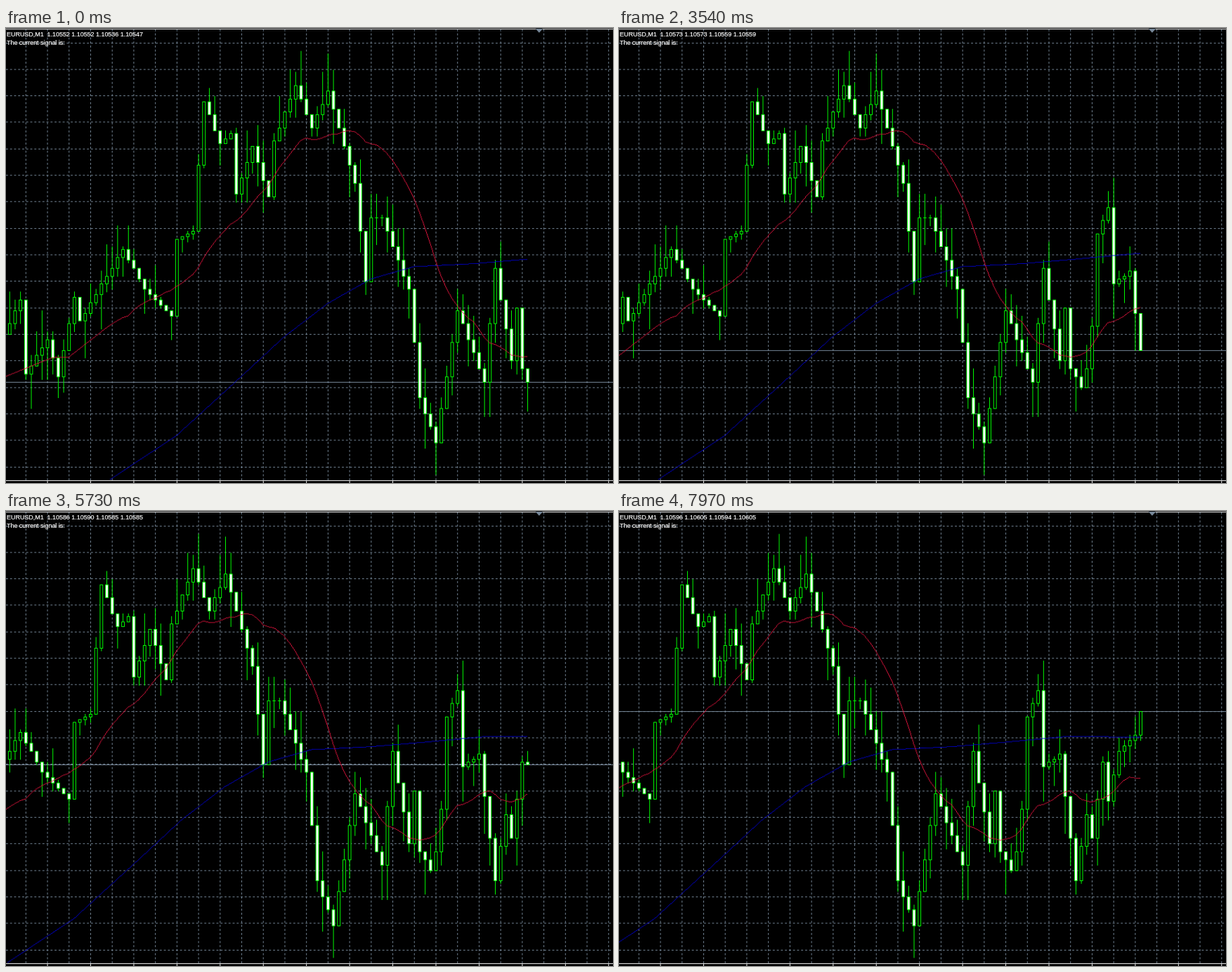
An HTML page with a canvas for the animation above (8000 ms loop, 864x648 px).

```html
<!DOCTYPE html>
<html lang="en">
<head>
<meta charset="utf-8">
<title>EURUSD,M1</title>
<style>
  html, body { margin: 0; width: 864px; height: 648px; overflow: hidden; background: #000; }
  canvas { position: absolute; left: 0; top: 0; }
  #info {
    position: absolute; left: 1px; top: 3px; color: #fff; white-space: pre;
    font: 9px/12px "Liberation Sans", Arial, sans-serif;
    letter-spacing: -0.04px; -webkit-text-stroke: 0.2px #fff;
  }
</style>
</head>
<body>
<canvas id="chart" width="864" height="648"></canvas>
<div id="info"><div id="quote"></div><div>The current signal is:</div></div>
<script>
const LOOP = 8000, TICK = 47.2, FIRST_TICK = 40;
const COUNT = 122, VISIBLE = 97, PERIOD = 20;
// The chart is laid out on a 900 x 675 pixel grid, then scaled down
const SCALE = 0.96, WIDTH = 900, BOTTOM = 671, PITCH = 8, LEFT = 5;
const LIME = '#00ff00', SLATE = '#778899';

// Turning points of the price: [candle, points above 1.10500]
const turns = [
  [-1, 65], [2, 78], [3, 50], [7, 63], [9, 49], [12, 79], [13, 70], [21, 97], [25, 82],
  [30, 72], [31, 101], [34, 104], [36, 153], [39, 137], [41, 141], [42, 118], [45, 136],
  [48, 117], [49, 138], [53, 159], [56, 143], [59, 157], [64, 122], [66, 85], [67, 109],
  [69, 109], [74, 82], [76, 41], [79, 24], [83, 74], [88, 47], [90, 90], [93, 55], [94, 75],
  [95, 52], [97, 45], [98, 52], [99, 68], [100, 103], [102, 113], [103, 84], [106, 89],
  [109, 41], [111, 66], [112, 57], [114, 86], [115, 71], [117, 90], [120, 96], [121, 105]];
// Start of the fast average, and the whole slow one
const earlyFast = [[-1, 48.8], [8, 56.2], [11, 56.3], [19, 69]];
const slow = [[19, 10.5], [31, 26.7], [43, 49], [51, 64.1], [59, 76.6], [67, 85.9],
  [75, 90.6], [86, 91.7], [96, 93.4], [107, 95.5], [122, 95.4]];
// [time, candle that opens then]
const schedule = [[-300, 96], [10, 97], [900, 99], [2210, 104], [3370, 108],
  [4640, 112], [4990, 113], [6480, 118], [7760, 121], [8040, 122]];

const ctx = document.getElementById('chart').getContext('2d');
const quote = document.getElementById('quote');
ctx.scale(SCALE, SCALE);

const mix = (a, b, k) => a + (b - a) * k;
const rowOf = points => Math.round(297 + (105 - points) * 3.925);

function interpolate(points, x) {
  let n = 1;
  while (n < points.length - 1 && points[n][0] < x) n++;
  const [x0, y0] = points[n - 1], [x1, y1] = points[n];
  return mix(y0, y1, (x - x0) / (x1 - x0));
}

// Seeded wick length: mostly short, now and then long
function wick(seed) {
  const noise = Math.sin(seed * 12.9898) * 43758.5453;
  return Math.round(14 * (noise - Math.floor(noise)) ** 2);
}

const closeAt = i => Math.round(interpolate(turns, i));
const candles = Array.from({ length: COUNT }, (_, i) => {
  const open = closeAt(i - 1), close = closeAt(i);
  return {
    open, close,
    high: Math.max(open, close) + wick(2 * i + 1),
    low: Math.min(open, close) - wick(2 * i + 2)
  };
});

// The price runs open, near extreme, far extreme, close
function formingCandle({ open, high, low, close }, phase) {
  const path = close >= open ? [open, low, high, close] : [open, high, low, close];
  const leg = Math.min(2, Math.floor(phase * 3));
  const price = Math.round(mix(path[leg], path[leg + 1], phase * 3 - leg));
  const seen = [...path.slice(0, leg + 1), price];
  return { open, high: Math.max(...seen), low: Math.min(...seen), close: price };
}

function rect(color, x, y, w, h) {
  ctx.fillStyle = color;
  ctx.fillRect(x, y, w, h);
}

function drawFrame() {
  rect('#000', 0, 0, WIDTH, 675);
  ctx.strokeStyle = SLATE;
  ctx.setLineDash([3, 3]);
  ctx.beginPath();
  for (let x = 29.5; x < WIDTH; x += 32) {
    ctx.moveTo(x, 2);
    ctx.lineTo(x, BOTTOM);
  }
  for (let k = 0; k < 17; k++) {
    const y = Math.floor(22 + k * 39.33) + 0.5;
    ctx.moveTo(0, y);
    ctx.lineTo(WIDTH, y);
  }
  ctx.stroke();
  rect('#fff', 0, 1, WIDTH, 1);
  rect('#fff', 0, BOTTOM, WIDTH, 1);
  for (let x = 61; x < WIDTH; x += 64) rect('#fff', x, BOTTOM + 1, 1, 3);
  ctx.fillStyle = SLATE;
  ctx.beginPath();
  ctx.moveTo(785, 1);
  ctx.lineTo(796, 1);
  ctx.lineTo(790.5, 7);
  ctx.fill();
}

function drawCandle({ open, high, low, close }, slot) {
  const x = LEFT + slot * PITCH;
  const top = rowOf(Math.max(open, close)), height = rowOf(Math.min(open, close)) - top;
  rect(LIME, x, rowOf(high), 1, rowOf(low) - rowOf(high) + 1);
  rect(LIME, x - 2, top, 5, height + 1);
  if (height > 1) rect(close < open ? '#fff' : '#000', x - 1, top + 1, 3, height - 1);
}

// One pixel line through pointsAt(candle index)
function drawCurve(color, first, pointsAt) {
  const end = LEFT + (VISIBLE - 1) * PITCH;
  const at = x => rowOf(pointsAt(first + (x - LEFT) / PITCH));
  for (let x = 0; x < end; x++) {
    const y0 = at(x), y1 = at(x + 1);
    if (y0 < BOTTOM) rect(color, x, Math.min(y0, y1), 1, Math.max(1, Math.abs(y1 - y0)));
  }
}

function render(time) {
  const tick = Math.floor((time - FIRST_TICK) / TICK + 0.4);
  const progress = interpolate(schedule, FIRST_TICK + tick * TICK);
  const last = Math.min(COUNT - 1, Math.floor(progress));
  const first = last - VISIBLE + 1;
  const now = formingCandle(candles[last], Math.min(1, progress - last));
  const shown = i => i === last ? now : candles[i];

  const average = i => {
    if (i < PERIOD - 1) return interpolate(earlyFast, i);
    let sum = 0;
    for (let k = i - PERIOD + 1; k <= i; k++) sum += shown(k).close;
    return sum / PERIOD;
  };
  const fast = i => {
    const whole = Math.floor(i);
    return mix(average(whole), average(Math.min(last, whole + 1)), i - whole);
  };

  drawFrame();
  rect(SLATE, 0, rowOf(now.close), WIDTH, 1);
  for (let i = first; i <= last; i++) drawCandle(shown(i), i - first);
  drawCurve('#0000cd', first, i => interpolate(slow, i));
  drawCurve('#dc143c', first, fast);

  const prices = [now.open, now.high, now.low, now.close];
  quote.textContent = 'EURUSD,M1  ' + prices.map(p => (1.105 + p / 1e5).toFixed(5)).join(' ');
}

function play() {
  render(performance.now() % LOOP);
  requestAnimationFrame(play);
}
play();
</script>
</body>
</html>
```
